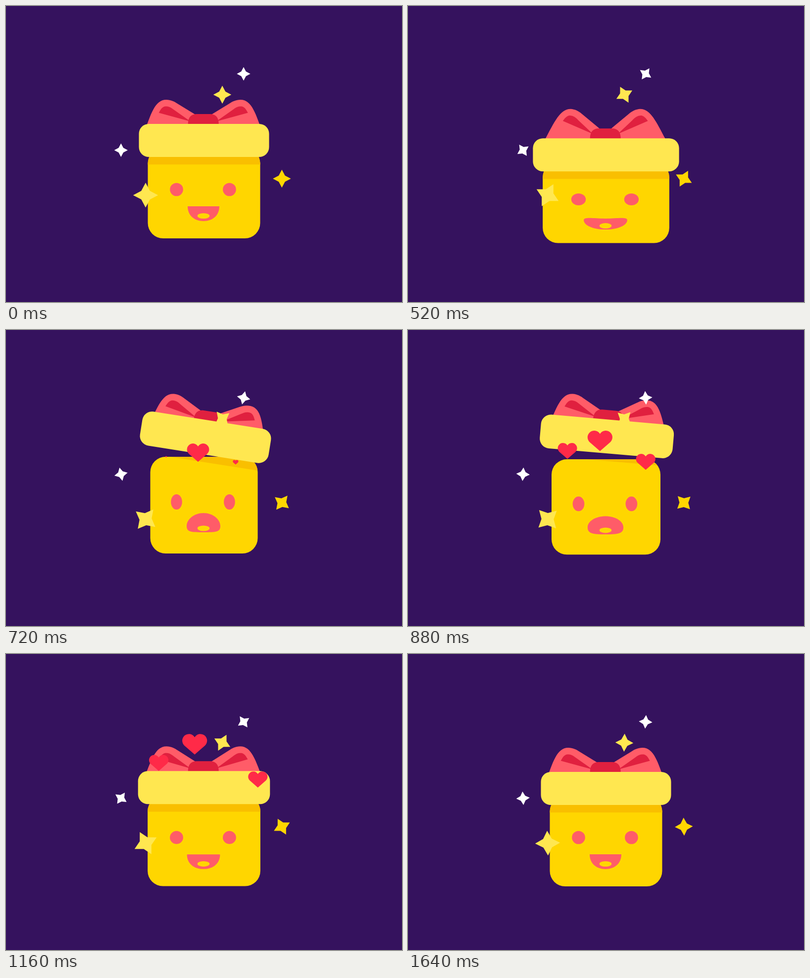
An HTML page with a canvas that plays this animation: 800x600 px, repeating every 1680 ms.

```html
<!DOCTYPE html>
<html lang="en">
<head>
<meta charset="utf-8">
<title>Happy gift box</title>
<style>
  html, body { margin: 0; width: 100%; height: 100%; overflow: hidden; background: #35125e; }
  canvas { display: block; }
</style>
</head>
<body>
<canvas id="stage" width="800" height="600"></canvas>
<script>
const ctx = document.getElementById('stage').getContext('2d');
const LOOP = 1680, DEG = Math.PI / 180;
const GOLD = '#ffd600', PALE = '#ffe750', SHADE = '#f9bf00', PINK = '#ff5c68',
  CRIMSON = '#e0203f', HEART = '#ff2a48', WHITE = '#fff';

const lobe = new Path2D('M0 30L-126 36L-120 19C-106-20-98-49-75-49C-66-49-58-45-53-41.5L-18-20L0-8Z');
const fold = new Path2D('M-90-22.5C-84-35-79-36-74-35.5C-68-35-64-32-60-29L-26-5Z');
const knot = new Path2D('M-31 5V0C-31-14-24-20-14-20H14C24-20 31-14 31 0V5Z');
const heart = new Path2D('M0 21L-20.4 3.15A13.5 13.5 0 1 1 0-14A13.5 13.5 0 1 1 20.4 3.15Z');

const clamp = v => Math.max(0, Math.min(1, v));

function smooth(t, from, to) {
  const u = clamp((t - from) / (to - from));
  return u * u * (3 - 2 * u);
}

// Eases from 0 to 1, holds, and eases back.
const pulse = (t, from, full, release, to) => smooth(t, from, full) - smooth(t, release, to);

function at(x, y, angle, draw) {
  ctx.save();
  ctx.translate(x, y);
  ctx.rotate(angle * DEG);
  draw();
  ctx.restore();
}

function fill(color, shape) {
  ctx.fillStyle = color;
  if (shape) ctx.fill(shape);
  else ctx.fill();
}

function ellipse(x, y, rx, ry, color) {
  ctx.beginPath();
  ctx.ellipse(x, y, rx, ry, 0, 0, 2 * Math.PI);
  fill(color);
}

function roundBox(x, y, w, h, r, color) {
  ctx.beginPath();
  ctx.roundRect(x, y, w, h, r);
  fill(color);
}

function drawBow(lift) {
  for (const side of [-1, 1]) {
    ctx.save();
    ctx.scale(side, 1);
    ctx.rotate(lift * DEG);
    fill(PINK, lobe);
    fill(CRIMSON, fold);
    ctx.restore();
  }
  fill(CRIMSON, knot);
}

function drawMouth(wide, leap) {
  const bend = wide ** 2;
  const top = 34 + 5 * wide - 11.5 * leap, chin = 64 - 3 * bend - 2.5 * leap;
  const half = 32 + 12 * wide + 2 * leap, side = 34 + 8 * bend + 15 * leap;
  const upper = side - 7 * bend - 14 * leap, lower = side + 18 - 8 * bend - 6 * leap;
  const inner = half * 0.55, jaw = half * (0.6 + 0.15 * leap);
  ctx.beginPath();
  for (const s of [1, -1]) {
    ctx.moveTo(0, top);
    ctx.bezierCurveTo(s * inner, top, s * half, upper, s * half, side);
    ctx.bezierCurveTo(s * half, lower, s * jaw, chin, 0, chin);
    ctx.lineTo(-s, chin);
    ctx.lineTo(-s, top);
  }
  // Both halves overlap a little at the seam; draw them as one shape.
  fill(PINK);
  ctx.fillRect(-1, top, 2, chin - top);
  ellipse(0, 53.5, 12.3, 5.5, GOLD);
}

function drawGift(t) {
  const crouch = pulse(t, 120, 510, 510, 720);
  const leap = pulse(t, 510, 720, 790, 1200);
  const pop = pulse(t, 510, 790, 790, 1200);
  const flutter = 0.75 * pulse(t, 800, 1040, 1040, 1200);
  const tilt = 9 * pulse(t, 540, 720, 760, 1020);

  const squash = crouch + 0.3 * flutter, wide = crouch ** 1.5 + flutter;
  const width = 227 + 29 * squash - 10 * leap;
  const height = 183 - 19 * squash + 13 * leap;
  const bottom = 471 + 10 * crouch ** 3 - 18 * leap;
  const lidX = 400 + tilt / 3, lidY = 272.5 + 30 * crouch ** 2 - 65 * pop;
  const lidW = 263 + 33 * crouch ** 3 + 32 * flutter, lidH = 67 + tilt / 3;
  const eyeY = 372 + 20.5 * crouch ** 1.75 - 23.5 * leap + 5 * flutter;
  const eyeR = 13.3 + 1.4 * wide - 2 * leap;

  ctx.save();
  roundBox(400 - width / 2, bottom - height, width, height, 31, GOLD);
  ctx.clip();
  at(lidX, lidY, tilt, () => {
    ctx.fillStyle = SHADE;
    ctx.fillRect(-200, -lidH / 2, 400, lidH + 15.3);
  });
  ctx.restore();

  for (const x of [344.5, 451.4]) ellipse(x, eyeY, eyeR, 176.5 / eyeR, PINK);
  at(399, eyeY, 0, () => drawMouth(wide, leap));

  at(lidX, lidY, tilt, () => {
    at(-1.3 + tilt / 3, -lidH / 2 + tilt / 5, 0, () => drawBow(8.4 * wide - 4 * leap));
    roundBox(-lidW / 2, -lidH / 2, lidW, lidH, 20, PALE);
  });
}

// Floats by (dx, dy) until 1320 ms; the powers bend its path.
function drawHeart(t, birth, size, x, y, dx, dy, powX, powY) {
  const age = Math.max(0, (t - birth) / (1320 - birth));
  const grow = clamp((t - birth) / 180);
  const shrink = clamp((t - 1060 - birth / 2) / 200);
  const scale = size * (1 - (1 - grow) ** 2) * (1 - shrink ** 2);
  at(x + dx * age ** powX, y + dy * age ** powY, 0, () => {
    ctx.scale(scale, scale);
    fill(HEART, heart);
  });
}

function drawStar(t, x, y, radius, turn, color) {
  at(x, y, turn * t / LOOP, () => {
    ctx.beginPath();
    for (let i = 0; i < 8; i++) {
      const r = i % 2 ? radius * 0.49 : radius, a = i * 45 * DEG;
      ctx.lineTo(r * Math.cos(a), r * Math.sin(a));
    }
    fill(color);
  });
}

const start = performance.now();

function frame() {
  const t = (performance.now() - start) % LOOP;
  ctx.fillStyle = '#35125e';
  ctx.fillRect(0, 0, 800, 600);
  drawGift(t);

  drawHeart(t, 600, 1, 388, 266.5, -27, -107.5, 5.5, 1);
  drawHeart(t, 693, 0.78, 461, 268, 64, -33, 1, 3);
  drawHeart(t, 713, 0.78, 323.5, 257.5, -31, -51.5, 2.4, 1.1);

  drawStar(t, 480, 137.5, 13.7, -180, WHITE);
  drawStar(t, 232.3, 292.3, 13.7, 180, WHITE);
  drawStar(t, 437, 179.8, 18.2, -90, PALE);
  drawStar(t, 557.3, 350, 18.2, 90, GOLD);
  drawStar(t, 282, 383.4, 25.2, 90, PALE);
  requestAnimationFrame(frame);
}
frame();
</script>
</body>
</html>
```
